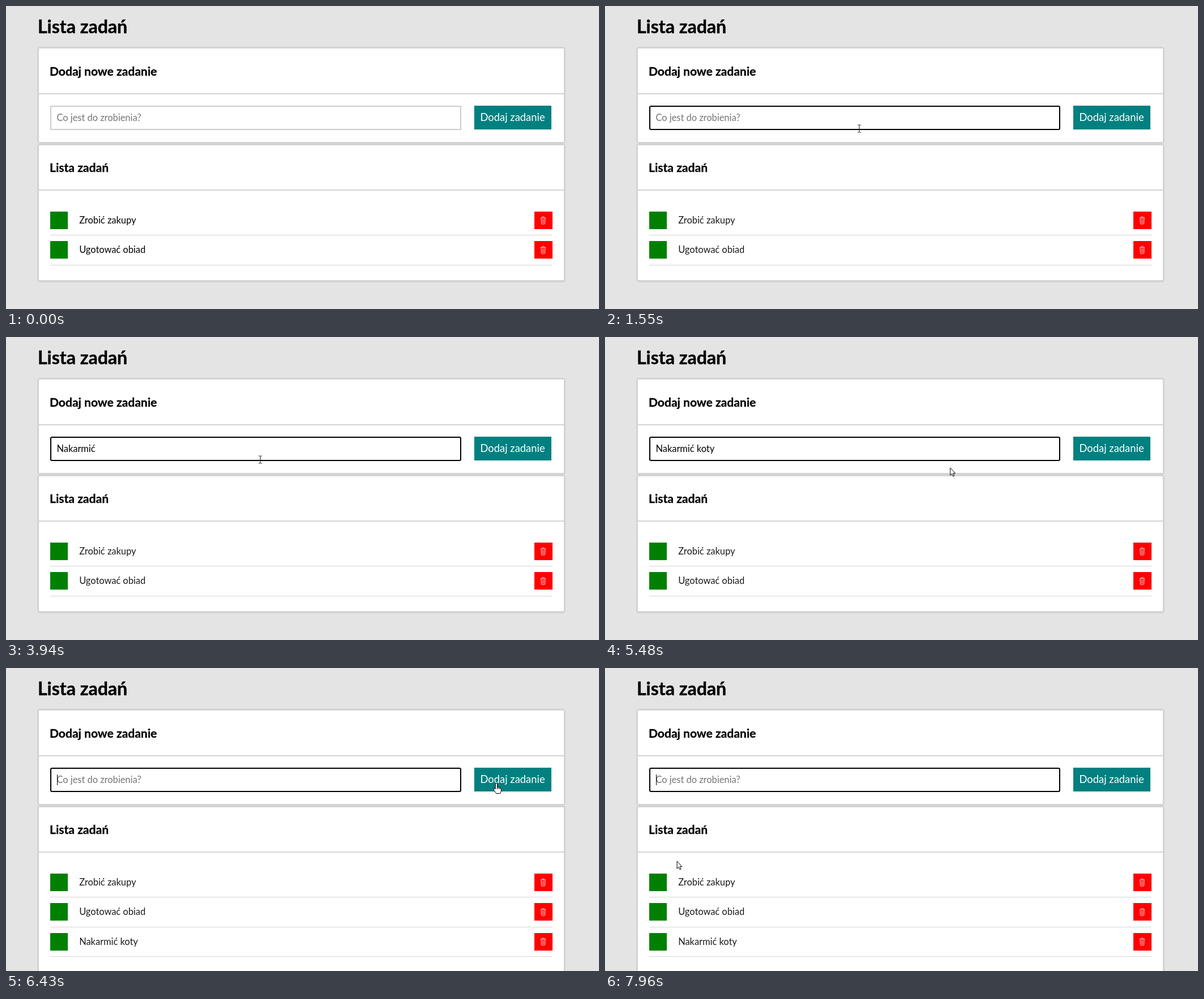
Recreate the animation shown at these times as an HTML page. Size 1046 by 535 pixels, loop 8 s.

```html
<!DOCTYPE html>
<html lang="pl">
<head>
<meta charset="utf-8">
<title>Lista zadań</title>
<style>
  html, body { margin: 0; width: 100%; height: 100%; overflow: hidden; background: #e4e4e4; }
  svg { display: block; width: 1046px; height: 535px; }
  text { font: 16.4px Lato, sans-serif; white-space: pre; }
  rect { shape-rendering: crispEdges; }
  .h1 { font-size: 32px; font-weight: 700; stroke: #000; stroke-width: .45; }
  .h2 { font-size: 21.05px; font-weight: 700; stroke: #000; stroke-width: .3; }
  .btn { font-size: 18.4px; fill: #fff; }
  .ring, .rule { fill: #d3d3d3; }
  .ring, .round { shape-rendering: auto; }
  .card { fill: #fff; }
  .done { fill: green; }
  .del { fill: red; }
  .line { fill: #d6d6d6; }
  .bin { fill: none; stroke: #fff; stroke-width: .8; }
  .slats { stroke-width: .5; }
  .cur path { fill: #fff; stroke: #000; stroke-linejoin: round; }
  .cur .open { fill: none; stroke: #222; }
</style>
</head>
<body>
<svg viewBox="0 0 1046 535">
  <text class="h1" x="56" y="48">Lista zadań</text>

  <rect class="ring" x="55" y="72" width="932" height="171" rx="5"/>
  <rect class="ring" id="ring" x="55" y="243" width="932" rx="5"/>
  <rect class="card" x="58" y="75" width="926" height="165"/>
  <rect class="card" id="card" x="58" y="246" width="926"/>
  <rect class="rule" x="58" y="154" width="926" height="2"/>
  <rect class="rule" x="58" y="324" width="926" height="2"/>
  <text class="h2" x="77" y="122.5">Dodaj nowe zadanie</text>
  <text class="h2" x="77" y="293">Lista zadań</text>

  <rect class="round" id="box" x="79" y="177" width="723" height="41" fill="#fff" stroke-width="2"/>
  <text id="hint" x="89.5" y="203" fill="#757575">Co jest do zrobienia?</text>
  <text id="typed" x="89.5" y="203"></text>
  <rect id="caret" y="188" width="1" height="19"/>
  <rect x="826" y="176" width="136" height="42" fill="teal"/>
  <text class="btn" x="836.5" y="203">Dodaj zadanie</text>

  <g id="list"></g>

  <circle id="click" r="12" fill="#ffe600" fill-opacity=".5"/>
  <g class="cur" id="arrow"><path d="M.5 .5V13.8L3.5 11L5.6 15.5L7.6 14.6L5.6 10.2H9.4Z"/></g>
  <g class="cur" id="hand">
    <path d="M-1.2 10V1.4a1.6 1.6 0 0 1 3.2 0V6.5l5 1q2 .5 2 2.5v3.2l-1.5 4.8h-7.3l-4.6-6.8q-.7-1.6 .9-1.9z"/>
    <path d="M2 6.5v4M4.6 7.2v3.3M7 8v2.6"/>
  </g>
  <g class="cur" id="beam"><path class="open" d="M-2 -5.5h2.5l.5 .5l.5 -.5h2.5M1 -5V7M-2 7.5h2.5l.5 -.5l.5 .5h2.5"/></g>
</svg>
<script>
const LOOP = 8000, TICK = 200 / 3, BLINK = 530, KEY_GAP = 92;
const FOCUS = 1000, PRESS = 6360, ADD = 6430;
const TASKS = ["Zrobić zakupy", "Ugotować obiad", "Nakarmić koty"];

// typing comes in short bursts, evenly spaced inside each one
const BURSTS = { 1820: "N", 2080: "aka", 2790: "rm", 3060: "i", 3400: "ć", 4000: " ", 4200: "kot", 4540: "y" };
const KEYS = Object.entries(BURSTS).flatMap(([start, s]) =>
  [...s].map((char, i) => ({ char, at: +start + i * KEY_GAP })));

// each move follows one cubic curve and slows towards its end
const MOVES = [
  { from: 250, to: 930, x: [572, 540, 490, 447], y: [449, 350, 250, 215] },
  { from: 5213, to: 6080, x: [447, 560, 800, 864], y: [215, 215, 275, 203] },
  { from: 6950, to: 7960, x: [864, 560, 260, 124.5], y: [203, 235, 205, 341.5] }
];

const $ = id => document.getElementById(id);
const set = (id, attrs) => { for (const k in attrs) $(id).setAttribute(k, attrs[k]); };
const show = (id, on) => { $(id).style.display = on ? "" : "none"; };
const between = (t, a, b) => t >= a && t < b;

$("list").innerHTML = TASKS.map((task, i) => `
  <g id="task${i}" transform="translate(0 ${363 + i * 52.3})">
    <rect class="done" x="78" width="31" height="31"/>
    <rect class="del" x="932" width="32" height="31"/>
    <path class="bin" d="M943 11h9M945.8 10.8v-1.3h3.4v1.3M943.8 11l.6 10q.1 1 1 1h4.2q.9 0 1-1l.6-10"/>
    <path class="bin slats" d="M945.8 12.5l.3 8M947.5 12.5v8M949.2 12.5l-.3 8"/>
    <rect class="line" x="78" y="41.4" width="886" height="1"/>
    <text x="129.2" y="21.2">${task}</text>
  </g>`).join("");

const bezier = ([a, b, c, d], u) =>
  a * (1 - u) ** 3 + 3 * b * u * (1 - u) ** 2 + 3 * c * u * u * (1 - u) + d * u ** 3;

function pointer(t) {
  const move = MOVES.filter(m => t >= m.from).pop();
  if (!move) return null;
  const { from, to, x, y } = move;
  const held = Math.floor((t - from) / TICK + 0.02) * TICK;
  const u = 1 - (1 - Math.min(1, held / (to - from))) ** 1.25;
  return [bezier(x, u), bezier(y, u)];
}

function cursorKind(p) {
  if (!p) return "";
  const [x, y] = p;
  if (between(y, 176, 219) && between(x, 78, 803)) return "beam";
  if (between(y, 176, 219) && between(x, 826, 962)) return "hand";
  return "arrow";
}

function draw(t) {
  const added = t >= ADD;
  const focused = between(t, FOCUS, PRESS) || added;
  const typed = KEYS.filter(k => k.at <= t);
  const text = added ? "" : typed.map(k => k.char).join("");

  set("box", { stroke: focused ? "#000" : "#ccc", rx: focused ? 2 : 0 });
  $("typed").textContent = text;
  show("hint", !text);

  const lastInput = added ? ADD : Math.max(FOCUS, ...typed.map(k => k.at));
  show("caret", focused && (t - lastInput) % (2 * BLINK) < BLINK);
  set("caret", { x: Math.round(90 + (text && $("typed").getComputedTextLength() - 0.5)) });

  show("task2", added);
  set("card", { height: added ? 290 : 238 });
  set("ring", { height: added ? 297 : 245 });
  set("list", { fill: focused ? "#1a1a1a" : "#000" });

  const p = pointer(t), kind = cursorKind(p);
  for (const id of ["arrow", "hand", "beam"]) show(id, id === kind);
  show("click", between(t, 930, 1100) || between(t, PRESS, ADD));
  if (p) {
    set(kind, { transform: `translate(${Math.round(p[0]) + 0.5} ${Math.round(p[1]) + 0.5})` });
    set("click", { cx: p[0], cy: p[1] });
  }
}

const origin = performance.now();
function frame() {
  draw((performance.now() - origin) % LOOP);
  requestAnimationFrame(frame);
}
frame();
</script>
</body>
</html>
```
